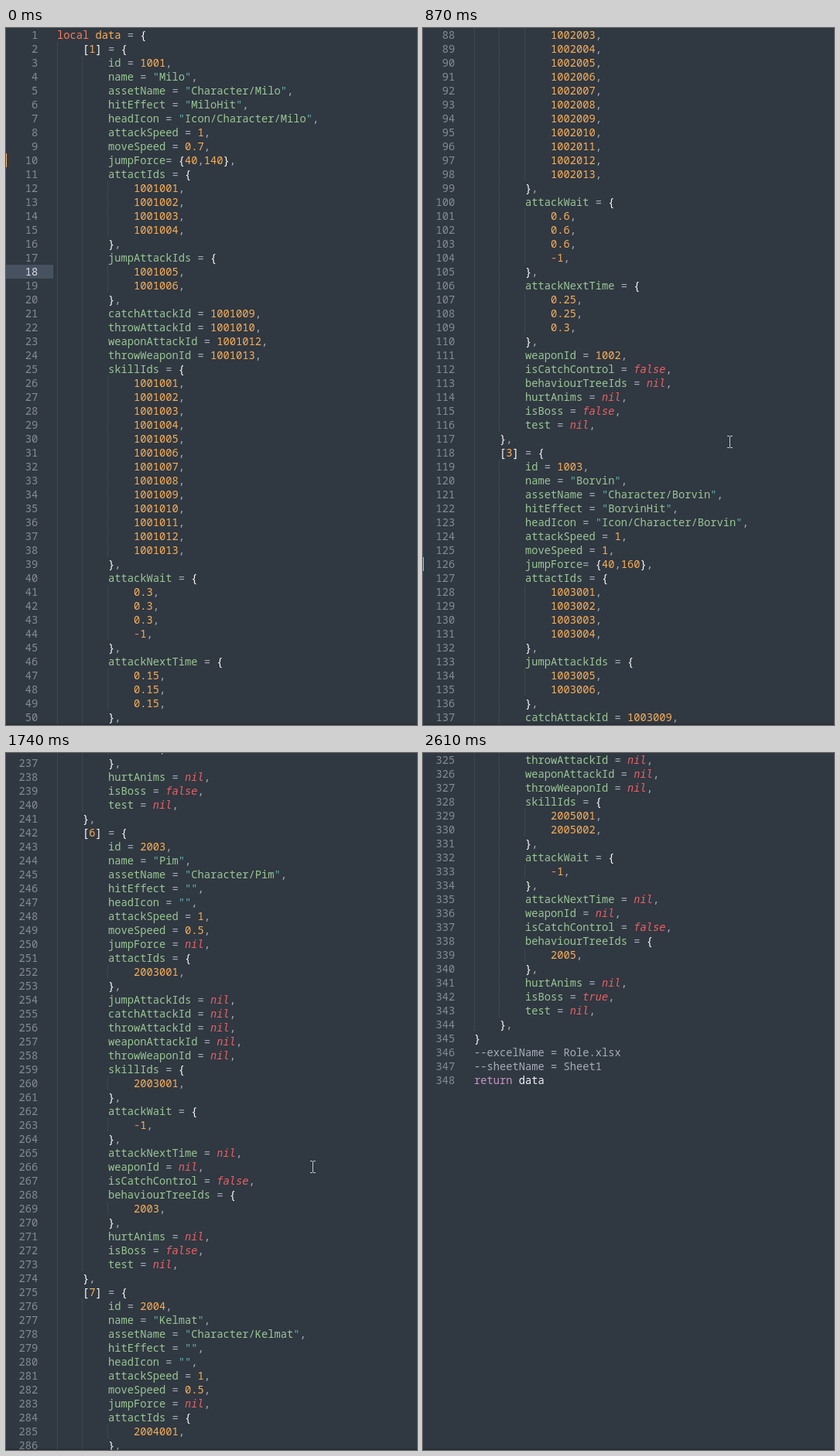
An HTML page for the animation above (3.18 s loop, 531 by 901 pixels).

```html
<!DOCTYPE html>
<html lang="en">
<head>
<meta charset="utf-8">
<style>
  html, body { margin: 0; width: 100%; height: 100%; overflow: hidden; background: #303841; }
  body { position: relative; }
  #code { position: absolute; left: 0; top: 0; width: 531px;
    font: 500 13.75px/18px "Noto Sans Mono", "DejaVu Sans Mono", monospace; color: #a6acb9; }
  .row { position: relative; height: 18px; padding-left: 66px; white-space: pre; }
  .row b { position: absolute; left: 0; width: 41.25px; text-align: right; font-weight: 500; color: #848b95; }
  .row i { display: inline-block; width: 33px; height: 18px; vertical-align: top;
    background: repeating-linear-gradient(#4c5861 0 1px, transparent 1px 2px) 0 0 / 1px 18px no-repeat; }
  .row i + i { margin-left: -1px; padding-right: 1px; }
  .active { background: linear-gradient(#475260, #475260) 0 0 / 61px 18px no-repeat; }
  .active b { color: #d8dee9; }
  .edited { box-shadow: inset 1px 0 #f9ae58; }
  .key, .str { color: #99c794; }
  .quote { color: #5fb4b4; }
  .num, .decl { color: #f9ae58; }
  .op, .local { color: #f97b58; }
  .const { color: #ec5f66; font: italic 13.7px/18px "DejaVu Sans Mono", monospace; }
  .brace { color: #fff; }
  .var { color: #f1f3f6; }
  .return { color: #c695c6; }
  #cursor { position: absolute; left: 0; top: 0; }
  #edge { position: absolute; left: 0; right: 0; bottom: 0; height: 3px;
    background: linear-gradient(transparent, rgba(0, 0, 0, .2)); }
</style>
</head>
<body>
<div id="code"></div>
<svg id="cursor" width="7" height="16" fill="none" stroke="#c3c8ce">
  <path d="M0 .5h3m1 0h3M3.5 1v14M0 15.5h3m1 0h3"/>
</svg>
<div id="edge"></div>
<script>
const lines = [];
const add = (depth, text) => lines.push({ depth, text });

function field(key, value) {
  if (value && typeof value === 'object') {
    add(2, `${key} = {`);
    for (const item of value) add(3, item + ',');
    add(2, '},');
  } else add(2, `${key} = ${value ?? 'nil'},`);
}

let count = 0;
function role(id, name, o) {
  const hero = id < 2000;
  const move = n => id * 1000 + n;
  const moves = (from, to) => Array.from({ length: to - from + 1 }, (_, i) => move(from + i));
  const moveId = i => o.special && move(o.special[i]);
  add(1, `[${++count}] = {`);
  field('id', id);
  field('name', `"${name}"`);
  field('assetName', `"Character/${name}"`);
  field('hitEffect', hero ? `"${name}Hit"` : '""');
  field('headIcon', hero ? `"Icon/Character/${name}"` : '""');
  field('attackSpeed', o.attack ?? 1);
  field('moveSpeed', o.speed);
  if (o.jump) add(2, `jumpForce= {${o.jump}},`);
  else field('jumpForce');
  field('attactIds', moves(1, hero ? 4 : 1));
  field('jumpAttackIds', o.air && moves(...o.air));
  ['catchAttackId', 'throwAttackId', 'weaponAttackId', 'throwWeaponId']
    .forEach((key, i) => field(key, moveId(i)));
  field('skillIds', moves(1, o.skills));
  field('attackWait', hero ? [o.wait, o.wait, o.wait, -1] : [-1]);
  field('attackNextTime', o.next);
  field('weaponId', hero ? id : null);
  field('isCatchControl', !!o.grab);
  field('behaviourTreeIds', hero ? null : [id]);
  field('hurtAnims');
  field('isBoss', !!o.boss);
  field('test', o.test);
  add(1, '},');
}

add(0, 'local data = {');
role(1001, 'Milo', { speed: 0.7, jump: '40,140', air: [5, 6], special: [9, 10, 12, 13], skills: 13,
  wait: 0.3, next: [0.15, 0.15, 0.15], test: ['a = "b"', 'c = "d"', 'e = "f"'] });
role(1002, 'Ned', { speed: 1, jump: '40,140', air: [5, 6], special: [9, 10, 12, 13], skills: 13,
  wait: 0.6, next: [0.25, 0.25, 0.3] });
role(1003, 'Borvin', { speed: 1, jump: '40,160', air: [5, 6], special: [9, 10, 11, 12], skills: 12,
  wait: 0.6, next: [0.2, 0.2, 0.4], grab: true });
role(2001, 'Tulk', { attack: 0.5, speed: 0.6, skills: 1 });
role(2002, 'Fenn', { speed: 0.5, air: [2, 2], skills: 2 });
role(2003, 'Pim', { speed: 0.5, skills: 1 });
role(2004, 'Kelmat', { speed: 0.5, skills: 2 });
role(2005, 'Grosk', { speed: 1, jump: '80,160', air: [2, 2], skills: 2, boss: true });
add(0, '}');
add(0, '--excelName = Role.xlsx');
add(0, '--sheetName = Sheet1');
add(0, 'return data');

const span = (type, text) => `<span class="${type}">${text}</span>`;
const tokens = /--.*|"(.*?)"|[a-z]\w*|[\d.]+|[{}[\]]|-/gi;

function paint(text) {
  return text.replace(tokens, (t, inner) => {
    if (t.startsWith('--')) return t;
    if (t[0] === '"') return span('quote', '"') + span('str', inner) + span('quote', '"');
    if (t === 'local' || t === 'return') return span(t, t);
    if (t === 'data') return span(text.startsWith('local') ? 'decl' : 'var', t);
    if (/^(true|false|nil)$/.test(t)) return span('const', t);
    if (/^\d/.test(t)) return span('num', t);
    if (t === '-') return span('op', t);
    return span(/\w/.test(t) ? 'key' : 'brace', t);
  });
}

const code = document.getElementById('code');
const cursor = document.getElementById('cursor');
code.innerHTML = lines.map(({ depth, text }, i) => {
  const mark = i === 17 ? ' active' : text.startsWith('jumpForce=') ? ' edited' : '';
  return `<div class="row${mark}"><b>${i + 1}</b>${'<i></i>'.repeat(depth)}${paint(text)}</div>`;
}).join('');

const STEP = 290, LOOP = 3180;
const scroll = [0, 162, 689, 1566, 2515, 3380, 4244, 5228, 5832];

function draw() {
  const step = Math.floor(performance.now() % LOOP / STEP);
  code.style.transform = `translateY(${-scroll[Math.min(step, 8)]}px)`;
  cursor.style.visibility = step > 0 && step < 9 ? 'visible' : 'hidden';
  cursor.style.transform = step < 8 ? 'translate(393px, 527px)' : 'translate(405px, 659px)';
  requestAnimationFrame(draw);
}
draw();
</script>
</body>
</html>
```
